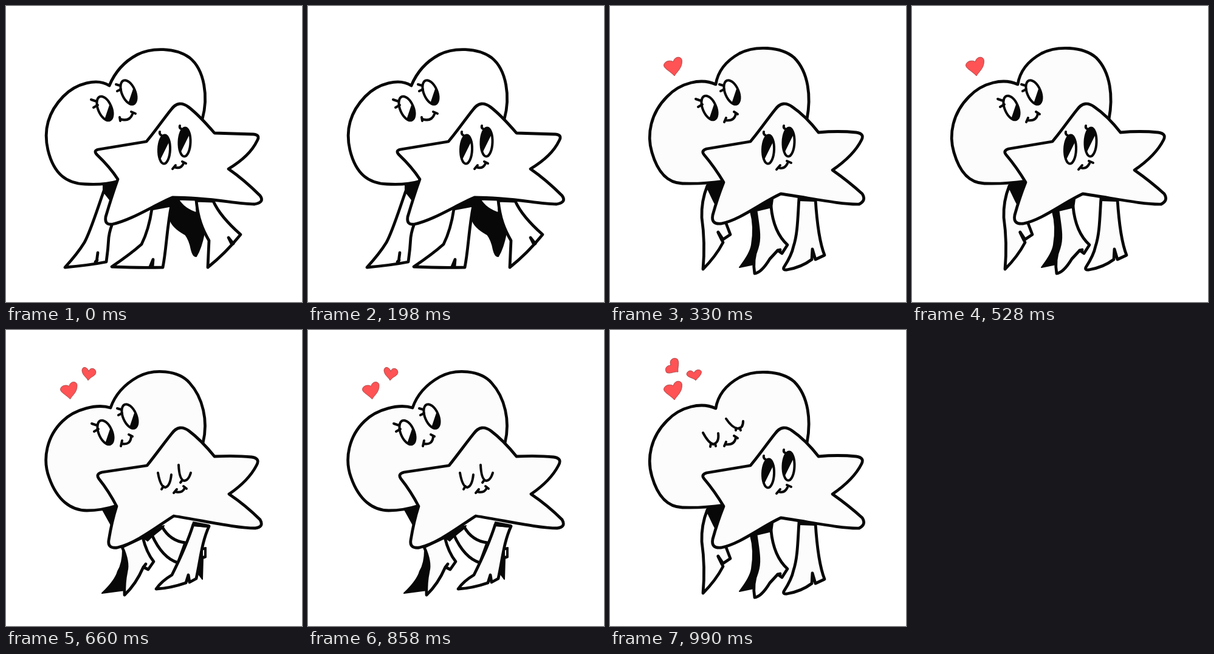
An HTML page for the animation above (1320 ms loop, 487x487 px).

```html
<!DOCTYPE html>
<html lang="en">
<head>
<meta charset="utf-8">
<title>Heart and star</title>
<style>
  html, body { margin: 0; width: 100%; height: 100%; overflow: hidden; background: #fff; }
  svg { display: block; width: 100%; height: 100%; }
  .ink { fill: none; stroke: #080808; stroke-width: 4.8; stroke-linecap: round; stroke-linejoin: round; }
  .white { fill: #fff; }
  .paper { fill: #fcfcfc; }
  .dark { fill: #080808; stroke-width: 2; }
  .face { stroke-width: 4; }
  .solid { fill: #080808; stroke: none; }
  .love { fill: #ff5355; stroke: #8a3030; stroke-width: .7; stroke-linejoin: round; }

  .pose { visibility: hidden; animation: quarter 1320ms step-end infinite; }
  .second { animation-delay: -990ms; }
  .third { animation-delay: -660ms; }
  .fourth { animation-delay: -330ms; }
  .odd { animation: half 660ms step-end infinite; }
  @keyframes quarter { 0% { visibility: visible } 25%, 100% { visibility: hidden } }
  @keyframes half { 0% { visibility: hidden } 50%, 100% { visibility: visible } }
</style>
</head>
<body>
<svg viewBox="0 0 487 487">
  <defs>
    <g id="heartEye" transform="rotate(-23)">
      <ellipse rx="11" ry="21" class="white"/>
      <path class="solid" d="M10.8-4L-7 16A11 21 0 0 0 10.8-4Z"/>
    </g>
    <g id="heartEyeLeft">
      <use href="#heartEye" transform="translate(162.5 168.5)"/>
      <path d="M140 154L149 157M144 167L151 163"/>
    </g>
    <g id="heartEyeRight">
      <use href="#heartEye" transform="translate(201.5 142)"/>
      <path d="M181 129L188 131M183 140L189 137"/>
    </g>
    <g id="starEye" transform="rotate(2)">
      <ellipse rx="9.5" ry="23.6" class="white"/>
      <path class="solid" d="M8-14L-6 17A9.5 23.6 0 1 1 8-14Z"/>
    </g>
    <g id="starEyes">
      <use href="#starEye" transform="translate(260.5 236)"/>
      <use href="#starEye" transform="translate(294 224)"/>
      <path d="M256 213Q252 211 253 207M288 202Q285 201 286 197"/>
    </g>
    <path id="love" d="M104 92C102 89 90 89 88.5 97C88 103 99 107 106 115C111 107 119 102 118.5 90C118 82 106 82 104 92Z"/>
  </defs>

  <!-- striding pose -->
  <g class="pose ink">
    <path class="dark" d="M160 294L186 289L172 319L160 306ZM240 333L274 316L283 318Q292 334 317 342L326 374Q321 399 313 412Q308 413 305 401Q302 385 295 376Q273 364 270 351L272 328Z"/>
    <path class="white" stroke-width="3" d="M283 318Q292 334 314 341L313 319Z"/>
    <path class="white" d="M161 304C150 335 139 371 129 389Q118 407 97 430C120 428 145 425 165 421Q168 400 169 381Q171 366 177 354L172 318Z"/>
    <path d="M149 421L151 406M150 418L147 421"/>
    <path class="white" d="M240 334Q235 368 223 392Q205 408 174 429Q220 431 258 430C264 400 264 370 272 328Z"/>
    <path d="M237 429L242 417L241 429"/>
    <path class="white" d="M313 320C316 350 323 367 334 386L332 430Q361 407 386 376Q352 346 341 321Z"/>
    <path d="M374 391L366 381L371 391"/>
    <path class="white" d="M323 186C333 150 327 105 302 85C279 68 239 68 216 80Q184 97 170 131C150 118 115 127 94 149C68 176 62 207 69 237C79 278 101 292 130 293Q161 295 185 288L260 260Z"/>
    <path class="white" d="M231 223C244 208 259 186 272 170Q284 154 300 166Q317 179 343 209L407 211Q419 212 413 222Q401 247 366 268Q392 286 418 312Q426 323 409 326C375 325 335 315 274 315C243 328 207 352 175 359Q162 361 164 347Q174 313 184 285Q171 265 150 245Q143 238 152 236Z"/>
  </g>

  <!-- standing pose -->
  <g class="odd ink">
    <path class="dark" d="M160 293L187 289L173 322ZM231 338L268 318L266 332L240 336Q245 378 242 407L237 425L213 430Q231 407 233 393Q238 363 231 338Z"/>
    <path class="paper" d="M160 296Q150 321 151 348Q157 390 153 433Q174 412 186 389L178 372L186 384L198 376L190 355L172 321Z"/>
    <path d="M178 373L184 385"/>
    <path class="paper" d="M240 336C243 360 248 380 242 398Q234 417 238 440Q249 439 263 416L276 402L283 407L292 393Q269 372 265 330Z"/>
    <path d="M276 402L280 401"/>
    <path class="paper" d="M311 316C309 345 309 374 302 395Q299 410 286 430Q284 435 291 434Q315 430 332 417L333 400L338 417L353 410Q342 382 338 318Z"/>
    <path class="dark" d="M311 315L338 318L337 321L311 320Z"/>
    <path class="paper" d="M324 186C331 150 327 109 303 85C281 66 238 65 213 78Q179 97 174 129C150 118 116 126 94 149C67 176 60 211 69 241C78 272 93 291 119 292Q154 293 187 288L260 260Z"/>
    <path class="paper" d="M231 223C244 208 259 186 272 170Q284 154 300 166Q322 181 343 208C365 206 385 206 405 208Q419 210 414 220Q401 246 366 270Q393 289 415 309Q422 320 410 326C380 327 325 315 281 309C250 323 214 352 183 358Q166 360 169 344Q177 315 187 290Q172 265 155 245Q149 238 159 235Z"/>
    <use href="#starEyes" class="face"/>
    <path class="face" d="M274 269L280 262M278 266Q287 269 292 259M291 255L298 258"/>
  </g>

  <!-- crossed pose -->
  <g class="pose third ink">
    <path class="paper" d="M240 337Q257 375 283 383L295 350Q270 347 257 324Z"/>
    <path class="dark" d="M158 294L182 290L173 321ZM224 341L260 322L255 328L240 340L233 347ZM192 362L200 384L196 428L158 433Q180 412 184 397Q192 384 192 362Z"/>
    <path class="paper" d="M191 357Q202 382 198 397Q194 416 195 436Q214 418 226 390L234 394L243 381Q231 366 225 341Z"/>
    <path d="M227 389L230 385"/>
    <path class="dark" d="M320 359L329 358L329 374L324 376L323 410L317 402Z"/>
    <path class="paper" stroke-width="2" d="M323 361L327 361L327 372L323 373Z"/>
    <path class="paper" d="M308 320C298 352 284 381 273 403Q256 413 247 426Q270 425 296 416L300 403L302 415L313 409C320 377 322 349 334 323Z"/>
    <path class="dark" d="M308 316L334 321L331 324L307 322Z"/>
    <path class="paper" d="M324 186C333 150 324 111 302 87C284 66 243 63 217 77Q183 96 172 128C150 121 113 130 93 150C68 174 59 211 71 243C84 280 107 297 133 297Q158 297 182 289L260 260Z"/>
    <path class="paper" d="M232 223C245 207 260 186 273 170Q285 154 301 166Q321 181 343 208C365 207 385 207 404 209Q419 211 412 223Q399 248 367 270Q395 289 418 312Q425 324 410 326C378 326 322 313 276 306C249 323 214 351 183 358Q167 360 169 346Q174 315 182 290Q169 265 153 245Q147 237 158 234Z"/>
  </g>

  <!-- faces -->
  <g class="ink face">
    <g class="pose">
      <use href="#heartEyeLeft"/><use href="#heartEyeRight"/>
      <use href="#starEyes"/>
      <path d="M187 183L188 189M188 186Q203 191 208 178M206 174L213 177"/>
      <path d="M274 268L279 262M277 265Q288 269 292 259M290 256L296 259"/>
    </g>
    <g class="pose second">
      <use href="#heartEyeLeft" x="1" y="-1"/><use href="#heartEyeRight" x="-1"/>
    </g>
    <path class="odd" d="M188 191L191 184M190 188Q205 190 207 177M204 174L210 178"/>
    <g class="pose third">
      <use href="#heartEyeLeft" x="1"/><use href="#heartEyeRight" x="2"/>
      <path d="M189 191L191 182M190 187Q205 190 206 175M202 172L208 175"/>
      <path d="M250 235Q254 258 262 259Q270 257 272 238M259 257L256 262M284 222Q285 246 293 248Q300 248 304 235M290 247L287 251"/>
      <path d="M276 268L281 262M279 266Q290 269 294 260M292 257L297 261"/>
    </g>
    <path class="pose fourth" d="M153 169Q162 186 170 188Q180 185 178 170M166 187L165 192M173 187L174 191M191 146Q201 161 210 162Q219 162 219 150M207 161L207 165M213 161L215 165"/>
  </g>

  <!-- floating hearts -->
  <g class="love">
    <use href="#love" class="odd"/>
    <g class="pose third">
      <use href="#love" transform="translate(8 8) scale(.92)"/>
      <path d="M136 68C134 60 125 59 125 67C126 75 132 77 135 83C140 76 148 76 148 69C147 62 138 61 136 68Z"/>
    </g>
    <g class="pose fourth">
      <path d="M138 71C135 64 126 67 126 73C128 79 137 78 141 83C145 78 150 75 150.5 69C150 64 140 64 138 71Z"/>
      <path d="M100 58C96 48 106 44 111 48C115 54 111 61 112 69C105 68 99 73 93 70C89 64 93 58 100 58Z"/>
    </g>
  </g>
</svg>
</body>
</html>
```
